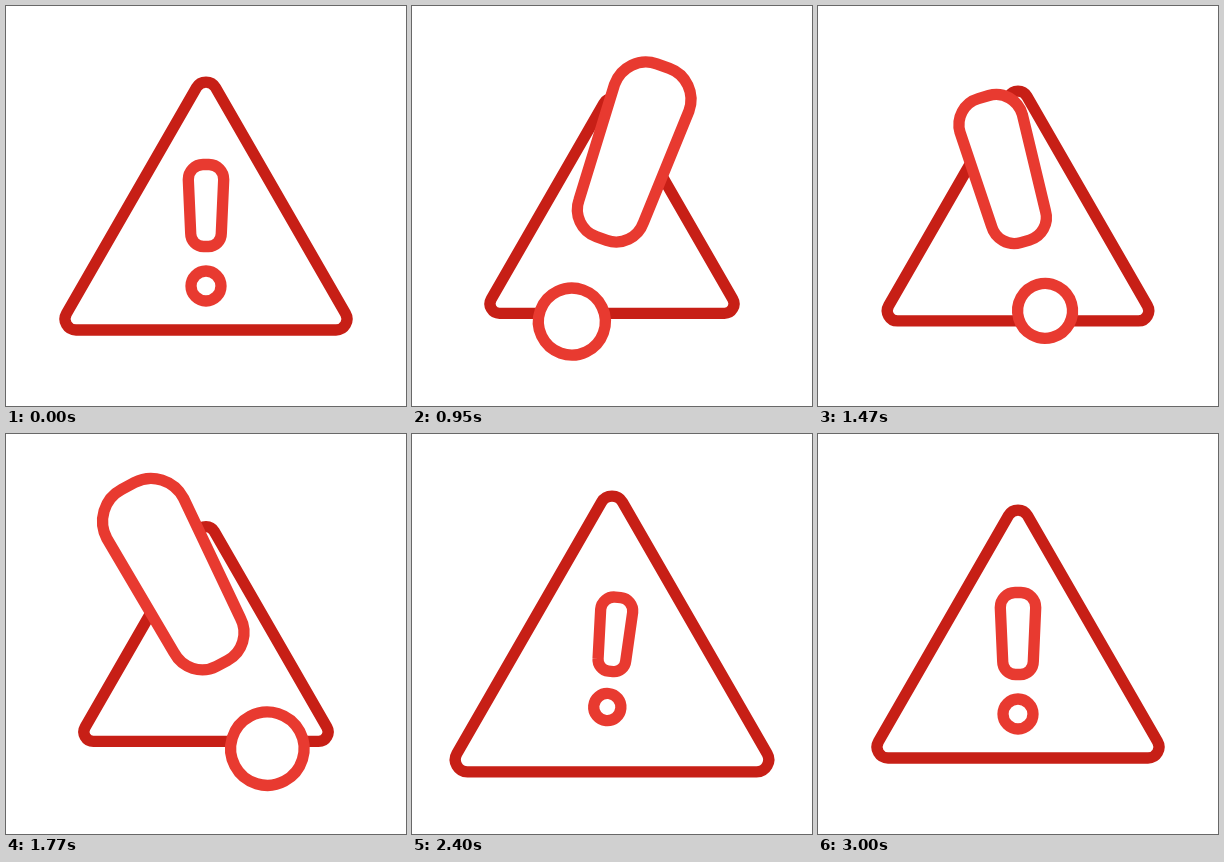
An HTML page that plays this animation: 400x400 px, repeating every 3.02 s.

```html
<!DOCTYPE html>
<html lang="en">
<head>
<meta charset="utf-8">
<title>Warning sign</title>
<style>
  html, body { margin: 0; height: 100%; overflow: hidden; background: #fff; }
  svg { display: block; width: 100%; height: 100%; }
  path, circle { fill: #fff; stroke-width: 11.3; vector-effect: non-scaling-stroke; }
  #sign { stroke: #c71f16; }
  #mark { stroke: #e83a30; }
</style>
</head>
<body>
<svg viewBox="0 0 400 400">
  <g id="sign">
    <path d="M-130 124A11 11 0 0 1-139.5 107.5L-9.5-118.5A11 11 0 0 1 9.5-118.5L139.5 107.5A11 11 0 0 1 130 124Z"/>
  </g>
  <g id="mark">
    <path d="M-3-68H3A14.7 15 0 0 1 17.7-53L15.3 1A12.8 13 0 0 1 2.5 14H-2.5A12.8 13 0 0 1-15.3 1L-17.7-53A14.7 15 0 0 1-3-68Z"/>
    <circle cy="53.5" r="15"/>
  </g>
</svg>
<script>
const LOOP = 3020;
const sign = document.getElementById('sign');
const mark = document.getElementById('mark');

// A pose is the change from rest: growth and tilt of the mark, growth of the sign.
// A swing enlarges the mark towards one side while the sign shrinks.
const swing = k => ({ grow: 1.45 * Math.abs(k), tilt: 28 * k, sign: -0.148 * Math.abs(k) });
const recoil = k => ({ grow: -0.1 * k, tilt: 6 * k, sign: 0.122 * k });
const poses = [swing(0), swing(1), swing(-0.33), swing(-1), recoil(1), recoil(-0.25), swing(0)];

// Both parts pass through the same poses; the sign follows a little later.
const markBeats = [490, 815, 1248, 1790, 2350, 2680, 3000];
const signBeats = [490, 860, 1240, 1945, 2345, 2680, 3000];

const ease = u => (1 - Math.cos(Math.PI * u)) / 2;

function value(name, beats, t) {
  const i = beats.findIndex(b => b > t);
  if (i < 1) return 0;
  const from = poses[i - 1][name], to = poses[i][name];
  return from + (to - from) * ease((t - beats[i - 1]) / (beats[i] - beats[i - 1]));
}

function draw(t) {
  const size = 1 + value('sign', signBeats, t);
  const grow = value('grow', markBeats, t);
  const tilt = value('tilt', markBeats, t);
  const y = 226.5 - 19 * Math.abs(grow);
  sign.setAttribute('transform', `translate(200 200) scale(${size})`);
  mark.setAttribute('transform', `translate(200 ${y}) rotate(${tilt}) scale(${1 + grow})`);
}

const start = performance.now();
function tick() {
  draw((performance.now() - start) % LOOP);
  requestAnimationFrame(tick);
}
tick();
</script>
</body>
</html>
```
